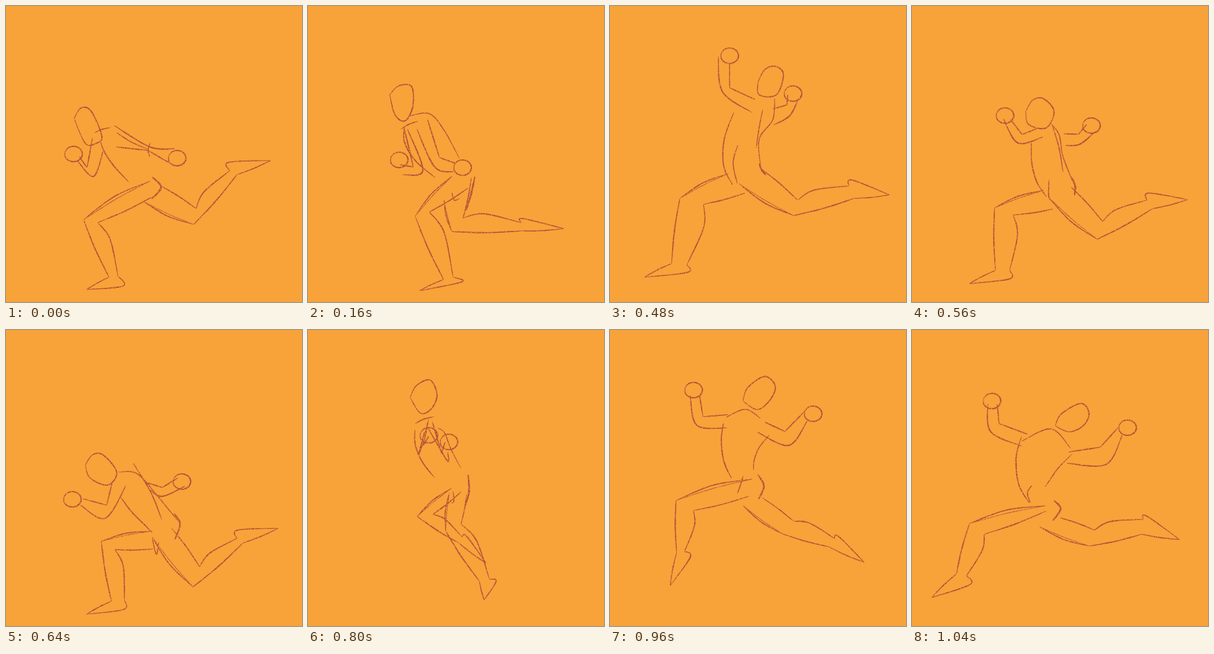
An HTML page that plays this animation: 500x500 px, repeating every 1120 ms.

```html
<!DOCTYPE html>
<html lang="en">
<head>
<meta charset="utf-8">
<title>Running figure</title>
<style>
html, body { margin: 0; width: 100%; height: 100%; overflow: hidden; background: #f8a23a; }
svg { display: block; width: 100%; height: 100%; }
</style>
</head>
<body>
<svg viewBox="0 0 500 500">
  <filter id="grain" filterUnits="userSpaceOnUse" x="0" y="0" width="500" height="500">
    <feTurbulence type="fractalNoise" baseFrequency=".55" numOctaves="2" seed="4"/>
    <feColorMatrix values="0 0 0 0 0  0 0 0 0 0  0 0 0 0 0  0 0 0 3 -.6" result="noise"/>
    <feComposite in="SourceGraphic" in2="noise" operator="in"/>
  </filter>
  <path id="figure" fill="#a33f36" fill-opacity=".85" filter="url(#grain)"/>
</svg>
<script>
const STEP = 80, COUNT = 14;

// Contour points. Legs: thigh front, knee front, thigh back, knee back, shin end, calf end, heel, toe.
// Arms: outer shoulder, outer elbow, inner shoulder, inner elbow, outer wrist, inner wrist, fist.
const landing = {
  head: '115,190 127,172 144,178 162,220 152,232 134,232',
  chest: '160,230 166,246 182,270 207,297',
  back: '150,214 160,209 168,207 177,205',
  rump: '247,289 262,306 246,326',
  accent: '187,214 212,230 240,242',
  detail: '244,231 240,243 243,255',
  armA: '183,202 243,238 186,238 240,244 285,241 276,265 289,257',
  armB: '164,245 148,288 146,223 137,273 121,262 124,255 114,250',
  legP: '243,296 131,361 248,322 155,366 174,458 189,456 198,473 136,479',
  legQ: '232,330 317,369 260,303 321,342 390,285 378,278 376,264 447,261'
};

const passing = {
  head: '138,150 153,135 175,136 177,170 164,194 147,184',
  chest: '163,203 163,230 182,262 215,290',
  back: '170,186 205,182 230,210 256,258',
  rump: '282,288 275,320 267,345',
  accent: '157,208 170,200 185,195',
  detail: '243,315 247,328 256,325',
  armA: '184,208 214,272 202,192 222,256 246,280 250,266 261,273',
  armB: '168,208 194,278 162,205 178,272 160,285 155,268 154,260',
  legP: '243,288 181,355 271,307 205,348 229,462 245,458 260,466 188,481',
  legQ: '230,328 243,381 276,290 262,358 360,380 360,366 363,359 432,376'
};

const leap = {
  head: '216,45 235,15 259,30 255,53 243,70 216,67',
  chest: '182,125 184,160 190,205 200,232',
  back: '245,72 244,120 230,180 238,222',
  rump: '239,218 247,235 237,252',
  accent: '190,234 194,270 202,244',
  detail: '220,40 230,31 243,36',
  armA: '237,95 172,128 243,75 180,102 124,86 135,70 122,70',
  armB: '246,108 268,162 250,108 278,150 300,162 298,139 307,146',
  legP: '200,245 264,354 238,252 266,304 330,405 328,384 346,386 375,455',
  legQ: '178,209 85,224 190,248 114,242 146,322 146,309 167,312 172,382'
};

const stride = {
  head: '250,128 262,107 280,102 293,116 281,150 252,150',
  chest: '209,180 193,225 192,270 207,302',
  back: '278,156 275,192 252,225 255,275',
  rump: '252,266 257,278 264,286',
  accent: '258,175 252,205 247,240',
  detail: '216,235 208,265 215,300',
  armA: '240,180 190,145 245,158 202,138 183,85 202,98 202,84',
  armB: '276,201 303,186 275,174 299,167 317,160 300,150 309,148',
  legP: '218,300 310,354 258,277 317,328 412,325 403,304 409,294 472,319',
  legQ: '200,283 118,325 228,316 158,335 104,435 130,437 131,450 58,458'
};

const crouch = {
  head: '134,228 146,211 164,211 187,240 172,262 142,250',
  chest: '194,283 212,307 230,325 247,342',
  back: '190,240 222,243 258,283 290,322',
  rump: '284,310 294,328 285,354',
  accent: '215,225 245,275 263,320',
  detail: '247,352 254,379 258,358',
  armA: '203,262 168,318 180,255 170,296 126,296 130,285 112,286',
  armB: '243,270 264,281 238,258 264,266 302,264 290,250 297,256',
  legP: '247,350 316,434 280,335 327,400 400,360 390,352 391,338 460,335',
  legQ: '245,340 161,357 248,370 184,371 178,458 200,456 199,472 136,480'
};

const rise = {
  head: '207,78 213,53 237,33 259,48 253,72 233,97',
  chest: '198,135 200,160 205,185 212,208',
  back: '268,145 256,165 252,190 260,208',
  rump: '259,200 269,225 264,250',
  accent: '205,108 222,101 240,98',
  detail: '247,230 246,248 230,261',
  armA: '236,120 276,163 258,105 273,145 312,128 308,111 322,118',
  armB: '210,135 160,150 205,110 167,135 143,97 158,93 147,83',
  legP: '255,207 126,249 242,256 160,265 150,340 160,333 173,338 170,412',
  legQ: '235,262 284,324 265,250 312,308 350,387 368,384 376,383 407,431'
};

const stretch = {
  head: '242,162 252,142 285,124 299,140 290,161 266,172',
  chest: '185,180 176,215 180,260 198,292',
  back: '270,210 248,232 235,250 225,265',
  rump: '240,288 251,302 238,322',
  accent: '185,188 235,167 268,200',
  detail: '203,262 195,275 200,292',
  armA: '262,225 328,227 265,206 318,198 355,178 348,165 364,165',
  armB: '185,196 133,172 195,176 147,158 128,125 144,125 135,120',
  legP: '225,297 97,327 226,306 122,345 75,412 92,415 98,430 33,452',
  legQ: '215,332 300,365 250,317 308,338 388,345 390,320 396,314 452,354'
};

const swapSides = p => ({ ...p, armA: p.armB, armB: p.armA, legP: p.legQ, legQ: p.legP });

const keys = [[0, landing], [2, passing], [4, leap], [6, stride], [8, crouch],
  [9, swapSides(passing)], [11, rise], [13, stretch], [14, landing]];

const points = text => text.split(' ').map(pair => pair.split(',').map(Number));
const mix = (a, b, k) => a + (b - a) * k;

// A line from a to b that swells sideways by a share of its length.
function bow(a, b, swell, peak = .5) {
  const dx = b[0] - a[0], dy = b[1] - a[1];
  return [a, [a[0] + dx * peak - dy * swell, a[1] + dy * peak + dx * swell], b];
}

function smooth(line) {
  const at = i => line[Math.min(line.length - 1, Math.max(0, i))];
  const out = [];
  for (let i = 0; i < line.length - 1; i++) {
    const [a, b, c, d] = [at(i - 1), at(i), at(i + 1), at(i + 2)];
    for (let n = 0; n < 8; n++) {
      const t = n / 8;
      out.push([0, 1].map(k => b[k] + t / 2 * (c[k] - a[k]
        + t * (2 * a[k] - 5 * b[k] + 4 * c[k] - d[k]
        + t * (3 * (b[k] - c[k]) + d[k] - a[k])))));
    }
  }
  return [...out, at(line.length - 1)];
}

// Outline of a pencil stroke that thins towards both ends.
function pencil(width, line) {
  const mid = smooth(line), last = mid.length - 1, left = [], right = [];
  mid.forEach(([x, y], i) => {
    const p = mid[Math.max(0, i - 1)], q = mid[Math.min(last, i + 1)];
    const dx = q[0] - p[0], dy = q[1] - p[1], length = Math.hypot(dx, dy) || 1;
    const press = .4 + .6 * Math.sqrt(Math.sin(Math.PI * i / last) + 1e-9);
    const half = width / 2 * press * (1 + .15 * Math.sin(x * 1.7 + y * 2.3));
    const nx = -dy / length * half, ny = dx / length * half;
    left.push([x + nx, y + ny]);
    right.unshift([x - nx, y - ny]);
  });
  return 'M' + [...left, ...right].map(p => p.map(v => v.toFixed(1)).join()).join('L') + 'Z';
}

function ring([x, y]) {
  const line = Array.from({ length: 10 }, (_, i) => {
    const angle = Math.PI * (i / 4.5 - .9);
    return [x + 15 * Math.cos(angle), y + 13 * Math.sin(angle)];
  });
  return pencil(2.4, line);
}

const leg = ([hip, knee, seat, hollow, shin, calf, heel, toe]) => [
  pencil(2, bow(hip, knee, .06)),
  pencil(1.1, bow(hip, knee, .02)),
  pencil(2, bow(seat, hollow, -.02)),
  pencil(2.2, bow(knee, shin, .02)),
  pencil(2.1, bow(hollow, calf, -.1, .35)),
  pencil(1.9, bow(shin, toe, .02)),
  pencil(2, [calf, heel, toe])
].join('');

const arm = ([outer, elbow, inner, crook, wrist, pulse, fist]) => [
  pencil(2.3, [outer, elbow, wrist]),
  pencil(2.1, bow(inner, crook, 0)),
  pencil(2.1, bow(crook, pulse, 0)),
  ring(fist)
].join('');

const parts = {
  head: p => pencil(2.2, [...p, p[0]]),
  chest: p => pencil(2.2, p),
  back: p => pencil(1.8, p),
  rump: p => pencil(3.2, p),
  accent: p => pencil(1.9, p),
  detail: p => pencil(1.9, p),
  armA: arm, armB: arm, legP: leg, legQ: leg
};

function drawing(index) {
  const next = keys.findIndex(key => key[0] > index);
  const [start, before] = keys[next - 1], [end, after] = keys[next];
  const k = (index - start) / (end - start);
  return Object.keys(parts).map(name => {
    const to = points(after[name]);
    return parts[name](points(before[name]).map((p, i) => p.map((v, c) => mix(v, to[i][c], k))));
  }).join('');
}

const drawings = Array.from({ length: COUNT }, (_, i) => drawing(i));
const figure = document.getElementById('figure');
const origin = performance.now();
let shown = -1;

function update(now) {
  const index = Math.floor(Math.max(0, now - origin) / STEP) % COUNT;
  if (index !== shown) figure.setAttribute('d', drawings[shown = index]);
  requestAnimationFrame(update);
}
update(origin);
</script>
</body>
</html>
```
